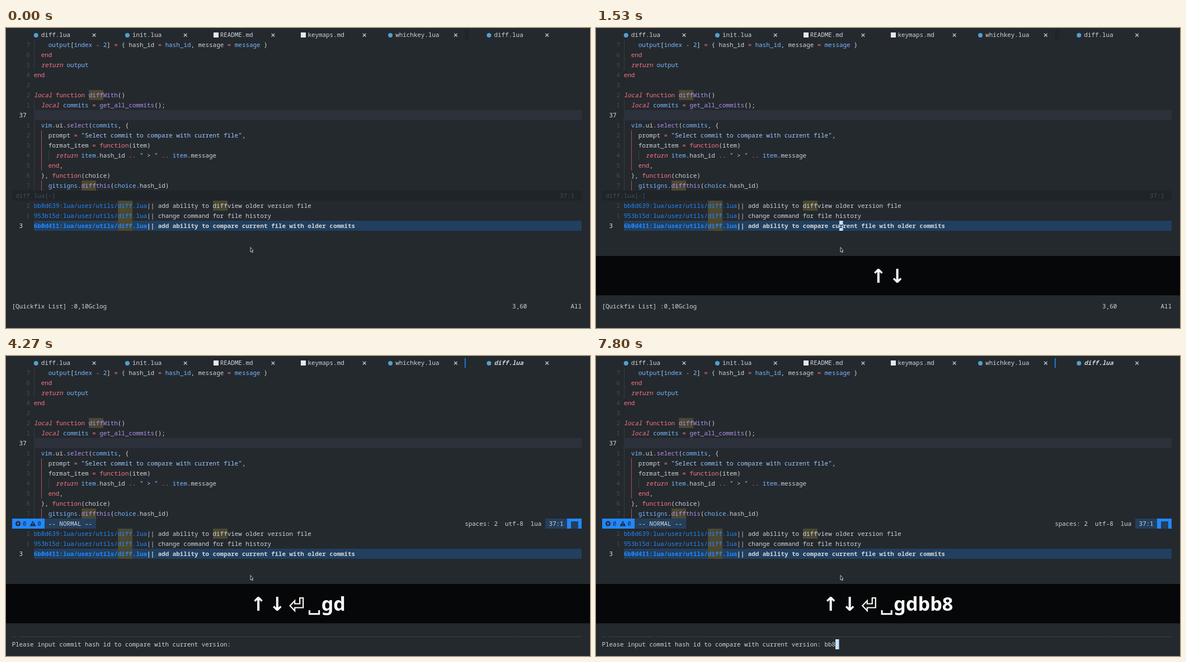
An HTML page with a canvas for the animation above (8 s loop, 1044 by 537 pixels).

```html
<!DOCTYPE html>
<html lang="en">
<head>
<meta charset="utf-8">
<title>Editor session</title>
<style>
  html, body { margin: 0; width: 100%; height: 100%; overflow: hidden; background: #24292e; }
  canvas { display: block; width: 1044px; height: 537px; }
</style>
</head>
<body>
<canvas id="stage"></canvas>
<script>
const W = 1044, H = 537, LOOP = 8000;
const CELL = 6.53, ROW = 18, LEFT = 10.5, TOP = 3;
const MONO = '10.88px "Noto Sans Mono", "DejaVu Sans Mono", monospace';
const BG = '#24292e', FG = '#d1d5da', BLUE = '#2188ff', NAVY = '#243f5c';
const DIM = '#444d56', LINE = '#2d313c', MATCH = '#4b4831', CARET = '#c8e1ff';
const INK = { w: FG, r: '#f97583', k: '#f97583', b: '#79b8ff', p: '#b392f0', s: '#9ecbff', h: BLUE };

const CODE = [
  '    ~boutput~w[~bindex ~r- ~b2~w] ~r= ~w{ hash_id ~r= ~bhash_id~w, message ~r= ~bmessage ~w}',
  '  ~rend',
  '  ~kreturn ~boutput',
  '~rend',
  '',
  '~klocal ~rfunction ~pdiffWith~w()',
  '  ~klocal ~bcommits ~r= ~pget_all_commits~w();',
  '',
  '  ~bvim~w.ui.~pselect~w(~bcommits~w, {',
  '    prompt ~r= ~s"Select commit to compare with current file"~w,',
  '    format_item ~r= ~rfunction~w(item)',
  '      ~kreturn ~bitem~w.hash_id ~r.. ~s" > " ~r.. ~bitem~w.message',
  '    ~rend~w,',
  '  }, ~rfunction~w(choice)',
  '    ~bgitsigns~w.~pdiffthis~w(~bchoice~w.hash_id)'
];
const LOG = [
  '~hbb8d639:lua/user/utils/diff.lua~w|| add ability to diffview older version file',
  '~h953b15d:lua/user/utils/diff.lua~w|| change command for file history',
  '~h6b0d411:lua/user/utils/diff.lua~w|| add ability to compare current file with older commits'
];
// icon column, name, close column
const TABS = [
  [6, 'diff.lua', 22], [31, 'init.lua', 47], [55, 'README.md', 71],
  [79, 'keymaps.md', 96], [103, 'whichkey.lua', 121], [130, 'diff.lua', 146]
];
const PROMPT = 'Please input commit hash id to compare with current version: ';
const ENTER = 2130, ASK = 3600;

// time, row, column; no row means blinked off
const CURSOR = [
  [0], [530, 19, 65], [670, 18, 65], [1200], [1330, 19, 65], [ENTER, 8, 6], [2270], [2730, 8, 6],
  [ASK, 28, 61], [4270], [4800, 28, 61], [5270], [5530, 28, 62], [5670, 28, 63],
  [6200], [6730, 28, 63], [7270], [7600, 28, 64]
];
const KEYS = [
  [670, '↑'], [1330, '↓'], [ENTER, '⏎'], [3070, '␣'], [3330, 'g'], [3530, 'd'],
  [5530, 'b'], [5670, 'b'], [7600, '8']
];

const canvas = document.getElementById('stage');
const ctx = canvas.getContext('2d');
const dpr = window.devicePixelRatio || 1;
canvas.width = W * dpr;
canvas.height = H * dpr;
ctx.scale(dpr, dpr);

const colX = c => LEFT + c * CELL;
const rowY = r => TOP + r * ROW;

function rect(x, y, w, h, color) {
  ctx.fillStyle = color;
  ctx.fillRect(x, y, w, h);
}

function cells(row, from, to, color) {
  const x = Math.round(colX(from));
  rect(x, rowY(row), Math.round(colX(to)) - x, ROW, color);
}

function text(row, col, str, color = FG, style = '') {
  ctx.font = style + ' ' + MONO;
  ctx.fillStyle = color;
  ctx.fillText(str, colX(col), rowY(row) + 13);
}

function poly(points, close = true) {
  ctx.beginPath();
  points.forEach(([x, y]) => ctx.lineTo(x, y));
  if (close) ctx.closePath();
}

function stroke(color, width) {
  ctx.strokeStyle = color;
  ctx.lineWidth = width;
  ctx.stroke();
}

function cross(x, y, r, color, width) {
  ctx.beginPath();
  ctx.moveTo(x - r, y - r); ctx.lineTo(x + r, y + r);
  ctx.moveTo(x + r, y - r); ctx.lineTo(x - r, y + r);
  stroke(color, width);
}

const plain = src => src.replace(/~./g, '');

// Coloured source line; every "diff" gets the search highlight.
function source(row, src, style = '') {
  for (const m of plain(src).matchAll(/diff/g)) cells(row, 6 + m.index, 10 + m.index, MATCH);
  let col = 6;
  ('~w' + src).split('~').slice(1).forEach(part => {
    const body = part.slice(1);
    text(row, col, body, INK[part[0]], part[0] === 'k' ? 'italic' : style);
    col += body.length;
  });
}

function lineNumber(row, n, current) {
  if (current) text(row, 2, String(n), '#e1e4e8');
  else text(row, 4, String(n), DIM);
}

function drawTabs(active) {
  TABS.forEach(([col, name, end], i) => {
    const x = colX(col), on = active && i === 5;
    if (name.endsWith('.md')) rect(Math.round(x) + 1, 8, 9, 9, '#e6e8ea');
    else {
      ctx.beginPath();
      ctx.arc(x + 4, 13, 4, 0, 7);
      ctx.fillStyle = '#51a0cf';
      ctx.fill();
    }
    text(0, col + 2, name, FG, on ? 'italic bold' : '');
    cross(colX(end) + 3.3, 12.7, 2.8, FG, 1.2);
  });
  if (active) rect(820, 4, 1.6, 17, BLUE);
  else rect(820, 3, 7, 18, '#1f2428');
}

function guide(col, first, last, color) {
  rect(Math.round(colX(col)), rowY(first), 1, (last - first + 1) * ROW, color);
}

function drawCode() {
  cells(8, 6, 156, LINE);
  CODE.forEach((src, i) => {
    const row = i + 1, current = row === 8;
    source(row, src);
    lineNumber(row, current ? 37 : Math.abs(8 - row), current);
  });
  const faint = '#383e45', scope = '#b3505e';
  guide(6, 1, 3, faint);
  guide(6, 7, 7, faint);
  guide(6, 9, 15, faint);
  guide(8, 10, 13, scope);
  guide(8, 15, 15, scope);
  guide(10, 12, 12, faint);
}

function drawStatus(active) {
  if (!active) {
    cells(16, 0, 156, '#1f2428');
    text(16, 1, 'diff.lua[-]', DIM);
    text(16, 150, '37:1', DIM);
    return;
  }
  cells(16, 0, 9, BLUE);
  cells(16, 9, 23, NAVY);
  cells(16, 146, 152, NAVY);
  cells(16, 152, 156, BLUE);
  rect(1010, 296, 13, 13, NAVY);
  ctx.beginPath();
  ctx.arc(21.5, 300, 4.6, 0, 7);
  ctx.fillStyle = BG;
  ctx.fill();
  cross(21.5, 300, 1.7, BLUE, 1.4);
  poly([[48, 295], [53.5, 304.5], [42.5, 304.5]]);
  ctx.fillStyle = BG;
  ctx.fill();
  rect(47.3, 298, 1.4, 3, BLUE);
  rect(47.3, 302, 1.4, 1.3, BLUE);
  text(16, 3, '0', BG);
  text(16, 7, '0', BG);
  text(16, 10, '-- NORMAL --');
  text(16, 124, 'spaces: 2');
  text(16, 135, 'utf-8');
  text(16, 142, 'lua');
  text(16, 147, '37:1');
}

function drawLog(current) {
  if (current !== 2) cells(17 + current, 6, 156, LINE);
  cells(19, 6, 156, '#213f5f');
  LOG.forEach((src, i) => {
    source(17 + i, src, i === 2 ? 'bold' : '');
    lineNumber(17 + i, i === current ? i + 1 : Math.abs(i - current), i === current);
  });
}

function drawFooter(t, current) {
  if (t < ENTER) {
    text(27, 0, '[Quickfix List] :0,10Gclog');
    text(27, 137, (current + 1) + ',60');
    text(27, 153, 'All');
    return;
  }
  rect(10, 502, 1019, 1, '#3a4046');
  [[17, 6], [102, 4], [113, 2], [177, 3], [914, 2]].forEach(([x, w]) => rect(x, 502, w, 1, BG));
  if (t >= ASK) {
    const typed = KEYS.filter(k => k[0] > ASK && k[0] <= t).map(k => k[1]).join('');
    text(28, 0, PROMPT + typed);
  } else if (t >= 3070) text(28, 145, t < 3330 ? '<20>' : '<20>g');
}

function drawCursor(t) {
  const [, row, col] = CURSOR.filter(c => c[0] <= t).pop();
  if (!row) return;
  rect(Math.round(colX(col)), rowY(row), 6.5, ROW, CARET);
  const src = LOG[row - 17];
  if (src) text(row, col, plain(src)[col - 6], BG, row === 19 ? 'bold' : '');
}

function drawPointer() {
  poly([[437, 392.5], [437, 401], [438.8, 399.4], [440, 402], [441.2, 401.4], [440, 398.9], [442, 398.5]]);
  ctx.fillStyle = '#101214';
  ctx.fill();
  stroke('#d8dadc', 0.9);
}

function keyFont(key) {
  ctx.font = /[a-z0-9]/.test(key)
    ? 'bold 34.2px "Noto Sans", "Open Sans", sans-serif'
    : 'bold 34.2px "DejaVu Sans", sans-serif';
}

function keyWidth(key) {
  if (key === '⏎') return 28.6;
  if (key === '␣') return 25.2;
  keyFont(key);
  return ctx.measureText(key).width;
}

function drawKey(key, x) {
  if (key === '⏎') {
    poly([[3, 447], [11.5, 438], [11.5, 443.5], [20.5, 443.5], [20.5, 433], [26.5, 433],
      [26.5, 450.5], [11.5, 450.5], [11.5, 456]].map(([a, b]) => [x + a, b]));
    stroke('#fff', 2.2);
  } else if (key === '␣') {
    poly([[4, 455], [4, 461.7], [21.2, 461.7], [21.2, 455]].map(([a, b]) => [x + a, b]), false);
    stroke('#fff', 3);
  } else {
    keyFont(key);
    ctx.fillStyle = '#fff';
    ctx.fillText(key, x, 456);
  }
}

function drawKeys(t) {
  const shown = KEYS.filter(k => k[0] <= t);
  if (!shown.length) return;
  rect(0, 408, W, 70.5, '#060708');
  const gap = 5.2;
  const items = shown.map(([, key], i) => ({ key, w: keyWidth(key), gap: i < 3 && i < shown.length - 1 ? gap : 0 }));
  let x = 522 - items.reduce((sum, it) => sum + it.w + it.gap, 0) / 2;
  items.forEach((it, i) => {
    drawKey(it.key, x);
    const fresh = i === items.length - 1 && t - shown[i][0] < 200 && it.key !== '⏎';
    if (fresh) rect(x, i < 2 ? 456 + i : 459, it.w, i < 2 ? 2 : 3, '#fff');
    x += it.w + it.gap;
  });
}

function draw(t) {
  const active = t >= ENTER;
  const current = t >= 670 && t < 1330 ? 1 : 2;
  rect(0, 0, W, H, BG);
  drawTabs(active);
  drawCode();
  drawStatus(active);
  drawLog(current);
  drawFooter(t, current);
  drawCursor(t);
  drawPointer();
  drawKeys(t);
}

const start = performance.now();
function tick() {
  draw((performance.now() - start) % LOOP);
  requestAnimationFrame(tick);
}
tick();
</script>
</body>
</html>
```
